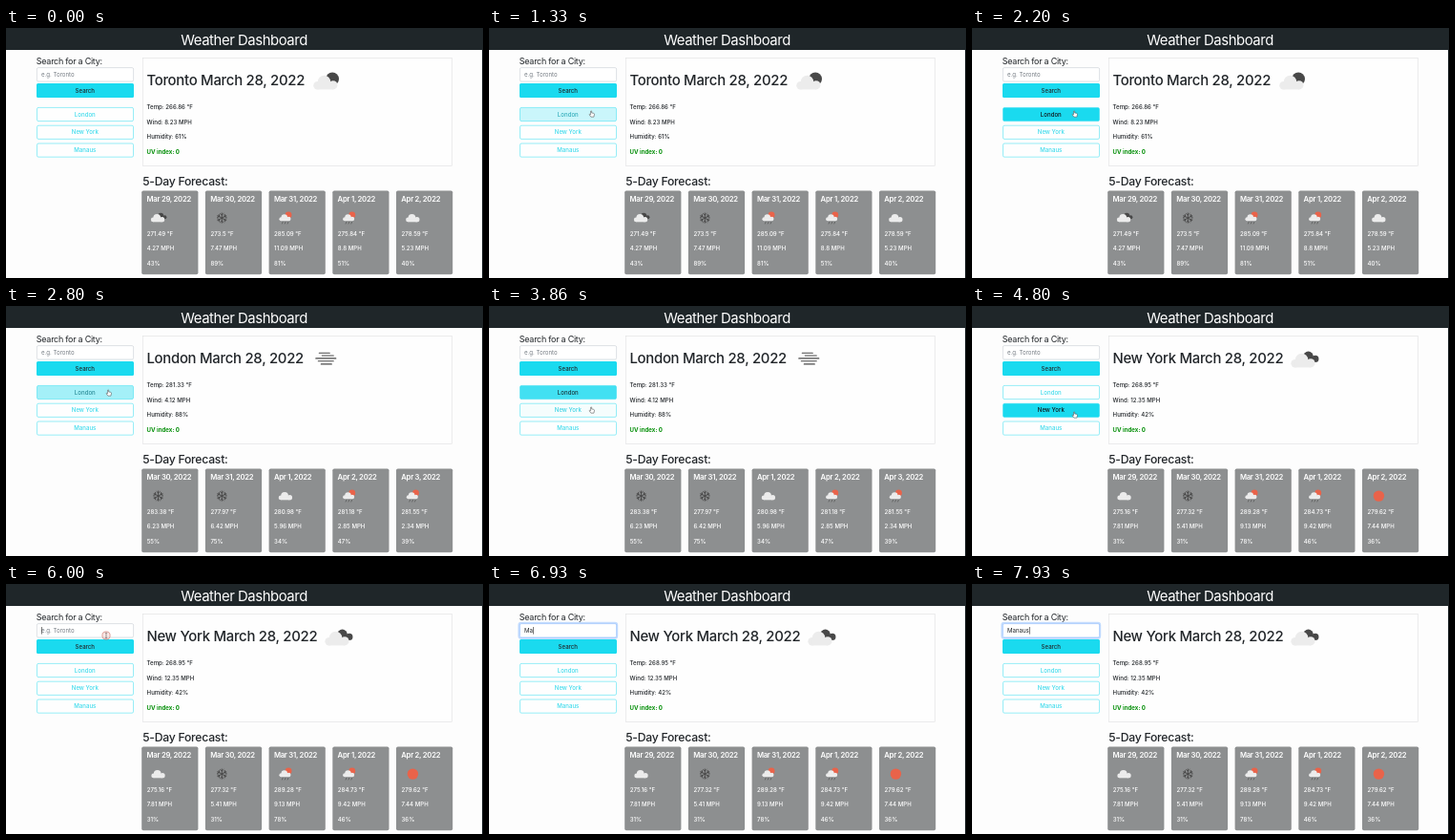
An HTML page that plays this animation: 500 by 262 pixels, repeating every 8000 ms.

```html
<!DOCTYPE html>
<html lang="en">
<head>
<meta charset="utf-8">
<title>Weather Dashboard</title>
<style>
html, body { margin: 0; width: 100%; height: 100%; overflow: hidden; background: #fdfdfd; }
svg { display: block; width: 500px; height: 262px; }
text { font: 500 6.1px Inter, Roboto, sans-serif; fill: #212529; white-space: pre; }
.title { font-size: 14.9px; font-weight: 400; letter-spacing: -.03em; fill: #fff; }
.city { font-size: 14.9px; letter-spacing: -.018em; }
.label { font-size: 9px; font-weight: 400; letter-spacing: -.03em; }
.section { font-size: 12.2px; letter-spacing: -.02em; }
.date { font-size: 7.7px; font-weight: 600; letter-spacing: -.035em; }
.card text { fill: #fff; }
.uv { font-weight: 700; fill: #07900b; }
.mid { text-anchor: middle; }
#entry { font-weight: 400; }
</style>
</head>
<body>
<svg id="stage" viewBox="0 0 500 262"></svg>
<script>
const LOOP = 8000;
const CYAN = [26, 218, 239], PALE = [62, 219, 236], WHITE = [254, 254, 254], INK = [16, 20, 24];

// Each day: date, icon, temperature, wind, humidity
const reports = [
  { at: 0, city: 'Toronto', icon: 'moon', iconX: 335.5, now: [266.86, 8.23, 61], days: [
    ['Mar 29', 'broken', 271.49, 4.27, 43], ['Mar 30', 'snow', 273.5, 7.47, 89],
    ['Mar 31', 'rain', 285.09, 11.09, 81], ['Apr 1', 'rain', 275.84, 8.8, 51],
    ['Apr 2', 'cloud', 278.59, 5.23, 40]] },
  { at: 2733, city: 'London', icon: 'mist', iconX: 335.3, now: [281.33, 4.12, 88], days: [
    ['Mar 30', 'snow', 283.38, 6.23, 55], ['Mar 31', 'snow', 277.97, 6.42, 75],
    ['Apr 1', 'cloud', 280.98, 5.96, 34], ['Apr 2', 'rain', 281.18, 2.85, 47],
    ['Apr 3', 'rain', 281.55, 2.34, 39]] },
  { at: 4600, city: 'New York', icon: 'broken', iconX: 348, now: [268.95, 12.35, 42], days: [
    ['Mar 29', 'cloud', 275.16, 7.81, 31], ['Mar 30', 'snow', 277.32, 5.41, 31],
    ['Mar 31', 'rain', 289.28, 9.13, 78], ['Apr 1', 'rain', 284.73, 9.42, 46],
    ['Apr 2', 'sun', 279.62, 7.44, 36]] }
];

// Keyframes: [time, value...]
const hover = [
  [[1297, 0], [1447, 1], [2732, 1], [2733, 0], [2742, 0], [2892, 1], [3835, 1], [3985, 0],
   [5400, 0], [5470, .4], [5560, 0]],
  [[3855, 0], [4005, 1], [4599, 1], [4600, 0], [4750, 1], [5400, 1], [5550, 0]],
  [[0, 0]]
];
const rings = [[2600, 2733], [4470, 4600]];
const pointer = [[1130, 205, 98], [1310, 108, 90], [2500, 108, 90], [2700, 108, 91],
  [3740, 108, 91], [3860, 108, 109], [4200, 108, 114], [5330, 108, 114], [5620, 105, 54]];
const typing = [[6730, 'M'], [6930, 'a'], [7130, 'n'], [7330, 'a'], [7600, 'u'], [7860, 's']];

const text = (x, y, s, cls = '') => `<text x="${x}" y="${y}" class="${cls}">${s}</text>`;
const rect = (x, y, w, h, attrs) =>
  `<rect x="${x}" y="${y}" width="${w}" height="${h}" ${attrs}/>`;
const circle = (x, y, r, attrs = '') => `<circle cx="${x}" cy="${y}" r="${r}" ${attrs}/>`;
const group = (x, y, k, body, attrs = '') =>
  `<g transform="translate(${x} ${y}) scale(${k})" ${attrs}>${body}</g>`;

const puff = (x, y, k, fill) => group(x, y, k,
  circle(-8.6, 3.2, 4.2) + circle(-1.6, -.4, 6.8) + circle(7.8, 2.8, 4.6) +
  rect(-8.6, 2, 16.5, 5.4, ''), `fill="${fill}"`);
const strokes = (d, width, attrs = '') =>
  `<path d="${d}" fill="none" stroke="#484848" stroke-width="${width}" stroke-linecap="round" ${attrs}/>`;
const LIGHT = '#ececec', DARK = '#484848', SUN = '#e9634a';

const icons = {
  cloud: puff(0, 0, 1, LIGHT),
  moon: circle(6.6, -3.6, 6.9, `fill="${DARK}"`) + puff(-.4, 0, 1, LIGHT),
  broken: puff(5.8, -3.8, .78, DARK) + puff(-.8, 0, 1, LIGHT),
  sun: circle(0, 0, 10, `fill="${SUN}"`),
  rain: circle(5.4, -5.6, 6, `fill="${SUN}"`) + puff(-.8, -.8, .84, LIGHT) +
    strokes('M-5 7.4l-1.2 3M0 7.4l-1.2 3M5 7.4l-1.2 3', 1.1),
  snow: [0, 60, 120].map(a => strokes(
    'M0-9V9M-3-8L0-5.2 3-8M-3 8L0 5.2 3 8', 1.6, `transform="rotate(${a})"`)).join(''),
  mist: strokes('M-7-6H4M-4-3.3H8M-10.5-.4H10.5M-8 2.5H8M-5 5.6H6', 1.1)
};

function forecast({ city, icon, iconX, now, days }) {
  const [temp, wind, humidity] = now;
  const cards = days.map(([date, sky, t, w, h], i) => group(142.2 + i * 66.7, 170.5, 1,
    rect(0, 0, 59.2, 87.8, 'rx="1.8" fill="#8d8f90"') +
    text(5.3, 11.6, date + ', 2022', 'date') +
    group(17.4, 28.6, .57, icons[sky]) +
    text(5.5, 47.3, t + ' °F') + text(5.5, 62.8, w + ' MPH') + text(5.5, 78.8, h + '%'),
    'class="card"'));
  return text(147.4, 59.5, city + ' March 28, 2022', 'city') +
    group(iconX, icon === 'mist' ? 55.3 : 57, 1, icons[icon]) +
    text(147.6, 84.7, `Temp: ${temp} °F`) + text(147.6, 100.5, `Wind: ${wind} MPH`) +
    text(147.6, 116.2, `Humidity: ${humidity}%`) + text(147.6, 131.6, 'UV index: 0', 'uv') +
    cards.join('');
}

const cityButton = (name, i) => {
  const y = 83.4 + i * 18.8;
  return `<g class="choice">` +
    rect(31.4, y - 1, 103.2, 16.2, 'class="ring" rx="2.4" fill="none" stroke="#8cecf6" stroke-width="1.6"') +
    rect(32.5, y, 101, 14.2, 'class="face" rx="1.5" stroke="#1adaef" stroke-opacity=".75" stroke-width=".6"') +
    text(82.8, y + 9.2, name, 'mid') + '</g>';
};

const hand = '<path d="M-1.6-.2V-3.3Q-1-4.3-.4-3.3V-1.2L2-.7Q2.9-.4 2.8.6L2.2 3.6H-1.3L-3.2 1Q-3.2 0-2.3.2L-1.6.8Z" fill="#fff" stroke="#444" stroke-width=".6" transform="scale(.88)"/>';
const arrow = '<path d="M-2-4V3L-.4 1.5.7 4 1.8 3.5.7 1.1H3Z" fill="#111" stroke="#fff" stroke-width=".5"/>';
const beam = '<path d="M-1.3-3Q0-3 0-2.2Q0-3 1.3-3M0-2.2V2.4M-1.3 3Q0 3 0 2.3Q0 3 1.3 3" fill="none" stroke="#444" stroke-width=".6"/>';

const stage = document.getElementById('stage');
stage.innerHTML =
  rect(0, 0, 500, 262, 'fill="#fdfdfd"') +
  rect(0, 0, 500, 23, 'fill="#1f2629"') + rect(499, 0, 1, 262, 'fill="#1f2629"') +
  text(249.6, 18, 'Weather Dashboard', 'title mid') +
  text(31.8, 38.2, 'Search for a City:', 'label') +
  rect(31.3, 40.7, 103, 16.2, 'id="glow" rx="2.4" fill="none" stroke="#c2dbfe" stroke-width="1.8"') +
  rect(32.4, 41.6, 101.2, 14.4, 'id="field" rx="1.5" fill="#fff" stroke-width=".6"') +
  '<text id="entry" x="37" y="51.2"></text>' +
  rect(0, 45, .6, 7.6, 'id="caret" fill="#222"') +
  rect(32, 58, 102, 15, 'rx="1.5" fill="#1adaef"') + text(82.8, 67.9, 'Search', 'mid') +
  ['London', 'New York', 'Manaus'].map(cityButton).join('') +
  rect(143.3, 31.4, 324.3, 113.2, 'fill="#fefefe" stroke="#dfe0e1" stroke-width=".6"') +
  text(143.2, 164.7, '5-Day Forecast:', 'section') +
  reports.map(r => `<g class="report">${forecast(r)}</g>`).join('') +
  '<g id="pointer">' + [arrow, hand, beam].map(p => `<g>${p}</g>`).join('') +
  circle(0, 0, 4.1, 'id="click" fill="#e58a80" fill-opacity=".2" stroke="#c9685e" stroke-width=".6"') + '</g>';

const byId = id => document.getElementById(id);
const reportNodes = [...stage.querySelectorAll('.report')];
const choices = [...stage.querySelectorAll('.choice')].map(node => ({
  ring: node.querySelector('.ring'), face: node.querySelector('.face'), label: node.querySelector('text')
}));
const [arrowNode, handNode, beamNode] = byId('pointer').children;
const entry = byId('entry');

const show = (node, on) => { node.style.display = on ? '' : 'none'; };
const within = (t, a, b) => t >= a && t < b;
const mix = (a, b, p) => `rgb(${a.map((v, i) => Math.round(v + (b[i] - v) * p))})`;

function sample(keys, t) {
  const next = keys.findIndex(k => k[0] > t);
  if (next === 0) return keys[0].slice(1);
  if (next < 0) return keys[keys.length - 1].slice(1);
  const a = keys[next - 1], b = keys[next];
  const p = (t - a[0]) / (b[0] - a[0]);
  return a.slice(1).map((v, i) => v + (b[i + 1] - v) * p);
}

function render(t) {
  const current = reports.filter(r => r.at <= t).length - 1;
  reportNodes.forEach((node, i) => show(node, i === current));

  choices.forEach(({ ring, face, label }, i) => {
    const [p] = sample(hover[i], t);
    face.style.fill = mix(WHITE, CYAN, p);
    label.style.fill = mix(PALE, INK, p);
    show(ring, rings[i] && within(t, ...rings[i]));
  });

  const [x, y] = sample(pointer, t);
  const overField = y < 57, overButton = x < 134 && !overField;
  show(byId('pointer'), within(t, 1130, typing[0][0]));
  byId('pointer').setAttribute('transform', `translate(${x} ${y})`);
  show(arrowNode, !overField && !overButton);
  show(handNode, overButton);
  show(beamNode, overField);
  show(byId('click'), within(t, 5930, 6130));

  const [focus] = sample([[6000, 0], [6150, 1]], t);
  byId('glow').style.opacity = focus;
  byId('field').style.stroke = mix([200, 205, 211], [134, 183, 254], focus);
  const typed = typing.filter(k => k[0] <= t).map(k => k[1]).join('');
  entry.textContent = typed || 'e.g. Toronto';
  entry.style.fill = typed ? '#212529' : '#747b82';
  show(byId('caret'), t >= 5950);
  byId('caret').setAttribute('x', typed ? 37.2 + entry.getComputedTextLength() : 37);
}

const start = performance.now();
function tick() {
  render((performance.now() - start) % LOOP);
  requestAnimationFrame(tick);
}
tick();
</script>
</body>
</html>
```
